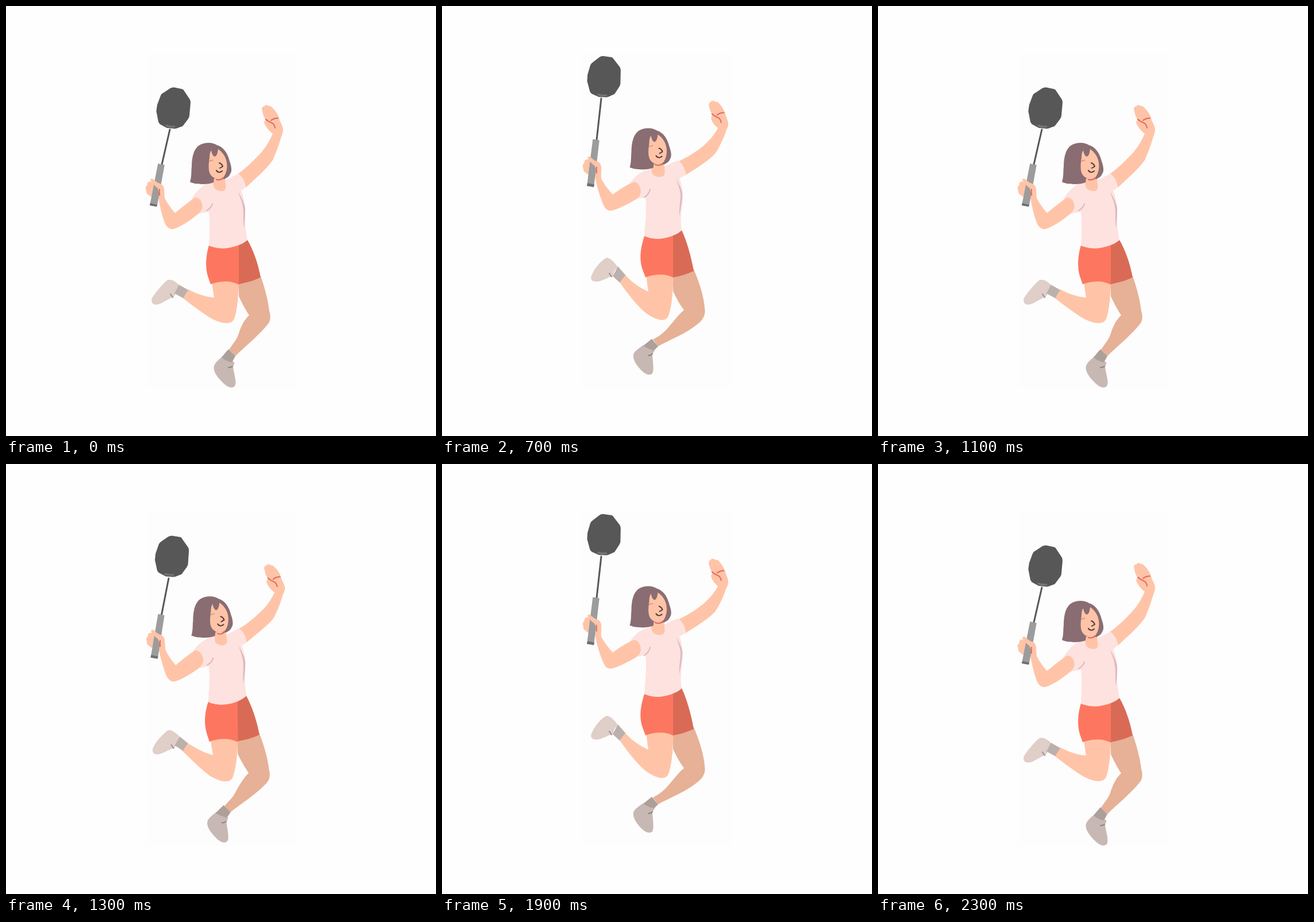
Recreate the animation shown at these times as an HTML page. Size 748x748 px, loop 2400 ms.

```html
<!DOCTYPE html>
<html lang="en">
<head>
<meta charset="utf-8">
<title>Badminton jump</title>
<style>
  html, body { margin: 0; width: 100%; height: 100%; overflow: hidden; background: #fefefe; }
  svg { display: block; width: 100vw; height: 100vh; }
  g[data-pose] { transform-box: fill-box; transform-origin: center; }
  .line { fill: none; stroke-linecap: round; stroke-linejoin: round; stroke-width: 2; }
  .skin { fill: #ffc4a7; }
  .shade { fill: #e6b196; }
  .hair { fill: #8a6d72; }
  .fold { stroke: #dcb8c0; }
  .red { stroke: #e0695f; }
  .dark { stroke: #54383b; }
</style>
</head>
<body>
<!-- d, data-b and data-c hold the low, rising and high pose; data-pose holds "dx dy angle" for the last two -->
<svg viewBox="0 0 748 748">
  <rect x="244" y="84" width="260" height="580" fill="#fdfdfd"/>

  <!-- back leg -->
  <path class="shade"
    d="M405 480L405 505C411 518 417 529 423 538C413 547 408 560 404 572C400 583 393 589 388 598L399 609C415 593 440 573 455 554C460 549 461 540 458 530C455 508 450 490 443 470Z"
    data-b="M401 474L401 501C408 514 414 525 421 534C412 542 402 556 392 567C386 575 377 581 368 587L377 598C395 588 425 576 445 559C454 552 460 543 457 532C455 508 447 486 438 464Z"
    data-c="M402 468L402 496C408 509 414 520 421 529C411 537 402 550 392 561C386 568 377 575 367 580L376 592C395 581 425 570 445 553C454 546 459 537 457 526C455 502 447 480 438 458Z"/>
  <path fill="#c8b8b3"
    d="M376 610C370 615 364 620 362 626C359 636 370 648 378 656C386 664 394 666 398 661C402 655 397 642 395 628C396 624 398 622 397 620L393 617Z"
    data-b="M351 596C344 601 336 606 334 612C332 622 342 634 349 641C356 648 364 649 367 645C370 640 368 626 367 613C368 609 370 607 371 605L368 603Z"
    data-c="M350 590C343 595 335 600 333 606C331 616 341 628 348 635C355 642 363 643 366 639C369 634 367 620 366 607C367 603 369 601 370 599L367 597Z"/>
  <path fill="#ada09a"
    d="M387 597L399 609L393 620C387 619 380 616 375 611Z"
    data-b="M366 585L378 598L371 605C364 603 357 601 350 598Z"
    data-c="M365 579L376 592L369 599C363 598 356 595 350 591Z"/>
  <path class="line" stroke="#8f8482"
    d="M387 629C390 629 392 628 394 627"
    data-b="M360 614C362 614 365 613 367 611"
    data-c="M359 608C361 608 364 607 366 605"/>

  <!-- front leg -->
  <path class="skin"
    d="M357 470C359 490 361 500 362 507C346 506 330 500 317 493L306 507C325 521 342 535 360 545C375 552 392 556 397 544C402 530 404 510 406 470Z"
    data-b="M353 464C354 485 357 495 358 502C345 496 330 484 316 472L306 483C318 500 333 521 350 537C365 548 384 556 391 546C398 530 401 505 402 465Z"
    data-c="M355 458C356 480 358 490 359 497C346 491 331 482 318 467L308 479C320 496 335 517 352 532C367 544 386 552 393 541C399 527 402 502 403 459Z"/>
  <path fill="#e0cec8"
    d="M301 485C292 477 285 474 279 478C270 487 260 498 254 508C251 516 256 521 265 519C275 516 284 508 292 506L296 499Z"
    data-b="M305 458C299 450 290 440 284 442C275 447 264 458 260 470C255 480 261 484 269 483C278 482 287 476 296 474L299 465Z"
    data-c="M306 454C300 446 291 436 285 438.5C276 444 266 455 261 467C256 476 262 480 270 479.5C280 478 288 472 297 470L300 461Z"/>
  <path fill="#bbb0ab"
    d="M301 485L317 494L308 508L293 500Z"
    data-b="M305 457L317 472L308 484L295 473Z"
    data-c="M306 453L319 468L309 481L297 470Z"/>
  <path class="line" stroke="#9d908c" d="M286 501L290 507" data-b="M290 469L294 475" data-c="M291 465L295 471"/>

  <!-- shorts -->
  <path fill="#fd7760"
    d="M353 416C348 434 346 452 351 470L356 484C372 478 392 477 405 485L407 412C390 424 370 424 353 416Z"
    data-b="M351 406C345 422 341 442 347 462L352 478C368 472 388 471 401 479L403 402C386 413 366 413 351 406Z"
    data-c="M352 400C347 416 342 436 348 456L354 472C370 466 390 465 403 473L404 397C387 407 367 407 352 400Z"/>
  <path fill="#d96b56"
    d="M405 415C411 413 416 410 420 407C430 424 438 446 443 472C431 478 418 481 405 484Z"
    data-b="M401 404C407 402 412 399 416 395C425 414 433 440 438 466C427 472 414 475 401 477Z"
    data-c="M402 398C408 397 413 394 417 390C426 409 433 435 438 461C427 466 415 470 402 472Z"/>

  <!-- free arm -->
  <path class="skin"
    d="M446 183C444 178 446 174 449 175C451 171 455 172 457 174C460 173 463 176 464 178C468 181 472 187 474 192C476 200 480 206 482 213C482 218 481 223 479 227C475 241 470 255 464 268C454 283 434 300 417 316C416 305 411 297 402 293C413 286 430 270 440 259C450 249 458 236 464 222C458 218 451 209 449 203C450 199 451 198 452 197C448 194 447 188 446 183Z"
    data-b="M459 184C457 179 459 175 461 175C464 171 468 173 470 175C474 174 476 177 477 179C481 182 485 188 486 194C488 200 492 206 493 212C493 217 491 220 489 223C485 237 478 252 471 263C460 275 438 288 421 300C420 289 416 280 408 276C424 269 440 259 451 249C461 241 469 231 475 220C469 217 463 209 462 203C463 199 464 198 465 196C461 193 460 188 459 184Z"
    data-c="M465 177C463 172 465 167 467 167C470 163 474 165 476 167C480 166 482 169 483 171C487 174 490 180 492 186C494 192 497 198 498 204C498 209 497 212 495 215C490 230 483 245 475 257C463 270 441 283 424 294C423 283 418 274 410 271C427 263 443 253 455 243C465 234 474 224 480 212C475 209 469 201 468 195C469 191 470 190 471 188C467 185 466 180 465 177Z"/>
  <g data-pose="12 -1.5 0, 17.5 -9.5 0">
    <path class="line red" d="M461 199C465 196 469 195 473 195M452 197C456 201 462 203 465 205C467 208 468 211 468 212"/>
  </g>

  <!-- shirt -->
  <path fill="#fde2df"
    d="M323 335C332 320 346 308 360 305L383 302C390 300 398 294 404 292C411 296 416 305 417 315L409 322C415 335 417 350 416 368C415 382 418 395 420 407C402 423 370 424 353 417C354 400 355 378 353 358L336 361Z"
    data-b="M327 313C336 300 348 292 362 290L386 285C394 282 402 276 409 275C416 279 421 290 422 299L412 306C417 318 419 332 417 350C415 368 414 382 416 395C398 413 366 414 351 406C352 385 356 362 353 339L339 342Z"
    data-c="M327 308C337 294 349 286 363 284L387 279C395 276 404 270 411 269C418 273 423 284 424 294L413 300C418 312 420 328 418 346C416 362 414 376 417 390C399 407 367 407 352 400C353 380 357 355 354 333L338 335Z"/>
  <path fill="#dcb8c0"
    d="M404 322C408 332 414 340 416 352C416 366 415 376 414 386C412 374 414 362 412 350C411 340 406 332 404 322Z"
    data-b="M407 305C411 315 416 320 417 332C417 346 414 360 412 373C411 360 414 346 414 333C413 322 409 315 407 305Z"
    data-c="M407 300C411 309 416 315 418 326C418 340 415 352 413 366C412 354 415 340 415 328C414 317 410 310 407 300Z"/>
  <path class="line fold"
    d="M349 356C354 353 358 349 359 344"
    data-b="M352 338C357 335 361 330 362 325"
    data-c="M352 333C358 329 361 324 362 319"/>

  <!-- neck and head -->
  <path class="skin"
    d="M360 296L361 314C364 322 379 325 382 318C383 312 381 305 381 294Z"
    data-b="M364 278L366 296C369 304 384 306 387 298C388 292 386 286 385 276Z"
    data-c="M363 273L365 290C368 298 384 300 387 293C388 287 387 281 386 271Z"/>
  <g data-pose="6 -21 0, 6.5 -25.5 0">
    <path class="hair" d="M320 306C323 298 322 288 323 280C323 264 326 250 335 243C344 237 358 236 367 242C380 246 386 258 389 270C393 281 393 288 390 292C388 297 384 299 380 301L362 300L361 307C350 311 330 311 320 306Z"/>
    <path class="skin" d="M354 264C354 258 355 254 357 251C358 257 360 261 363 262C367 261 368 256 369 249C375 253 381 260 383 268C386 278 384 290 379 297C372 304 360 301 355 292C351 284 353 272 354 264Z"/>
    <path class="line" stroke="#b98078" style="stroke-width:1.2" d="M354 270L360 268"/>
    <path class="line dark" d="M371 273C374 274 376 276 377 279L372 282M366 286C368 290 373 290 376 287"/>
  </g>
  <path class="line red"
    d="M366 302C370 303 375 302 378 299"
    data-b="M371 282C375 284 380 283 384 280"
    data-c="M371 276C376 278 380 277 384 275"/>

  <!-- racket arm -->
  <path class="skin"
    d="M265 333C268 350 271 362 275 374C278 383 283 389 291 388C303 385 322 372 334 362C340 357 343 351 341 344C340 338 335 333 329 333C317 341 304 352 294 360C287 352 280 342 276 334L275 318L264 318Z"
    data-b="M266 302C270 320 276 336 279 345C283 355 287 362 295 362C306 360 325 350 338 342C345 337 347 330 344 322C342 314 337 310 332 309C320 315 306 325 297 333C290 325 282 314 278 304L277 290L266 290Z"
    data-c="M266 296C269 313 274 329 278 339C282 350 286 357 294 356C305 354 325 344 338 336C345 331 347 325 345 317C343 310 339 306 334 306C321 311 306 321 297 328C290 320 281 309 277 300L276 284L265 284Z"/>
  <g data-pose="2.5 -32 0, 2 -38.5 0">
    <path class="skin" d="M251 305C246 306 245 309 246 311C242 314 242 319 244 320C243 325 246 328 248 328C249 331 253 332 256 331L263 312Z"/>
  </g>

  <!-- racket -->
  <g data-pose="-7.5 -45.5 -3.5, -9.5 -54.5 -4">
    <path fill="#575757" stroke="#575757" stroke-width="2" stroke-linejoin="round" d="M286 144C288 143 290 142.500 292 142.500L304 145C307 145 308 146 309 148L319 163C320 165 320 167 320 169L318 191C318 193 317 194 316 196L307 208L296 212C294 212.500 292 212.500 290 212L280 211L269 205C267 204 267 203 266 201L262.500 183L264 172L270 156C271 154 272 153 274 152Z"/>
    <path class="line" stroke="#777" style="stroke-width:3" d="M279 208C284 210 289 210 293 210"/>
  </g>
  <path class="line" stroke="#575757" style="stroke-width:3"
    d="M285 215L271 276" data-b="M279 171L269.5 240" data-c="M277 161L269 233"/>
  <path fill="#9c9c9c" stroke="#9c9c9c" stroke-linejoin="round" stroke-width="1.5"
    d="M265 275L275 277L262 348L251 346Z"
    data-b="M264.5 239.5L274 241L264.5 320L254 318Z"
    data-c="M263 232.5L273 234L263.5 314L253 312Z"/>
  <path fill="#6f6f6f"
    d="M251 343L263 345.5L262 349L250 347Z"
    data-b="M254 314L266 316.5L265 321L253 319Z"
    data-c="M253 308L265 310.5L264 315L252 313Z"/>
  <g data-pose="2.5 -32 0, 2 -38.5 0">
    <path class="skin" d="M251 302C253 299 256 300 258 303L265 308C271 309 274 312 275 318L275 332L267 332C266 326 266 320 263 316C259 313 253 308 251 302Z"/>
    <path class="line red" d="M267 319C266 323 267 326 267 329"/>
  </g>
</svg>
<script>
  const STEP = 100;
  // How much of the low, rising and high pose goes into each step of the jump.
  const MIX = [
    [1, 0, 0], [.58, .67, -.25], [.25, 1, -.25],
    [0, 1, 0], [0, 0, 1], [0, -.4, 1.4]
  ];
  const numbers = text => text.match(/-?[\d.]+/g).map(Number);
  const blend = (keys, mix) =>
    keys[0].map((_, i) => keys.reduce((sum, key, j) => sum + key[i] * mix[j], 0));

  const morphs = [...document.querySelectorAll('path[data-b]')].map(el => {
    const d = el.getAttribute('d');
    return { el, d, keys: [d, el.dataset.b, el.dataset.c].map(numbers) };
  });
  const groups = [...document.querySelectorAll('g[data-pose]')].map(el => ({
    el, keys: [[0, 0, 0], ...el.dataset.pose.split(',').map(numbers)]
  }));

  function pose(mix) {
    for (const { el, d, keys } of morphs) {
      const values = blend(keys, mix);
      let i = 0;
      el.setAttribute('d', d.replace(/-?[\d.]+/g, () => values[i++].toFixed(2)));
    }
    for (const { el, keys } of groups) {
      const [x, y, turn] = blend(keys, mix);
      el.style.transform = `translate(${x}px, ${y}px) rotate(${turn}deg)`;
    }
  }

  // Up and back down, with both end poses held for two steps.
  let shown = -1;
  function draw() {
    const beat = Math.floor(performance.now() / STEP) % 12;
    const step = Math.min(beat, 11 - beat);
    if (step !== shown) pose(MIX[shown = step]);
    requestAnimationFrame(draw);
  }
  draw();
</script>
</body>
</html>
```
